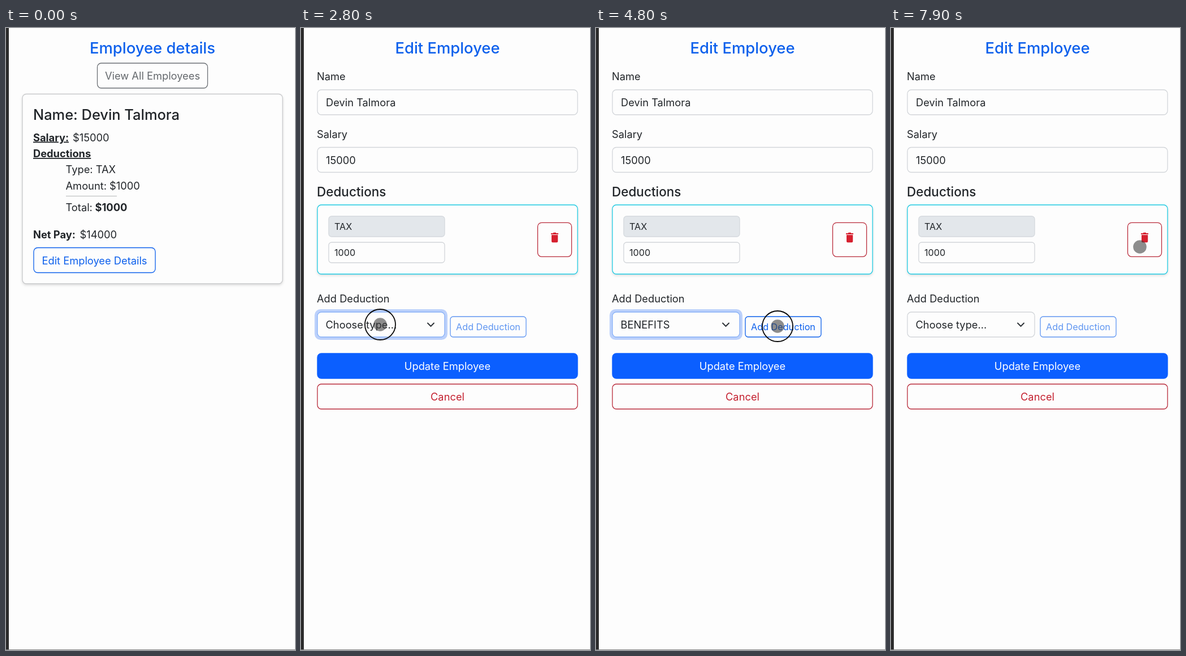
An HTML page for the animation above (8000 ms loop, 511 px wide and 1097 px high).

```html
<!DOCTYPE html>
<html lang="en">
<head>
<meta charset="utf-8">
<title>Employee payroll</title>
<style>
html, body { margin: 0; width: 100%; height: 100%; overflow: hidden; background: #fdfdfd; }
svg { display: block; }
text { font: 18.3px Inter, "Noto Sans", sans-serif; font-optical-sizing: none; fill: #212529; white-space: pre; }
.title { font-size: 27.4px; font-weight: 500; fill: #0d60ec; }
.name { font-size: 25.4px; font-weight: 500; }
.sub { font-size: 22.5px; font-weight: 500; }
.small { font-size: 16.2px; }
.item { font-size: 12.8px; fill: #f4f4f4; }
.bold { font-weight: 700; }
.line { text-decoration: underline; }
.mid { text-anchor: middle; }
.blue { fill: #0d60ec; }
.red { fill: #c4202f; }
.grey { fill: #65696d; }
.white { fill: #fff; }
.card { filter: drop-shadow(0 2px 2px rgba(0, 0, 0, .13)); }
.menu { filter: drop-shadow(0 3px 5px rgba(0, 0, 0, .35)); }
</style>
</head>
<body>
<svg id="stage" width="511" height="1097" viewBox="0 0 511 1097"></svg>
<script>
const BLUE = '#0d60ec', RED = '#b92b3b', CYAN = '#1fcbe3', LINE = '#d3d6da';
const PERSON = 'Devin Talmora', CARD_STEP = 141.6;
const $ = id => document.getElementById(id);

const box = (x, y, w, h, stroke, fill = '#fdfdfd', r = 7, extra = '') =>
  `<rect x="${x}" y="${y}" width="${w}" height="${h}" rx="${r}" fill="${fill}" stroke="${stroke}" stroke-width="1.3" ${extra}/>`;
const text = (x, y, str, cls = '', id = '') =>
  `<text x="${x}" y="${y}" class="${cls}" id="${id}">${str}</text>`;
const field = (y, label, value) =>
  text(28, y - 17, label) + box(29, y, 460, 44, LINE) + text(44, y + 29.3, value);

const deduction = (type, amount) =>
  box(29, 312, 460, 122, CYAN, '#fdfdfd', 7, 'class="card"') +
  box(49, 332, 205, 36, '#d5d9de', '#e3e7eb', 5) + text(59, 356.2, type, 'small') +
  box(49, 378, 205, 36, LINE, '#fdfdfd', 5) + text(59, 402.2, amount, 'small') +
  box(418.5, 343.3, 60, 60, RED) +
  '<path d="M442 362h3.5l1-1.2h4l1 1.2h3.5v2h-13zM443 365h11.2v11.2q0 2-2 2h-7.200q-2 0-2-2z" fill="#d6202f"/>';

const details =
  text(259, 45, 'Employee details', 'title mid') +
  box(161.5, 62, 195, 44, '#6c7075') + text(259, 90.6, 'View All Employees', 'mid grey') +
  box(29, 116.500, 460, 334.5, '#c9cacc', '#fdfdfd', 7, 'class="card"') +
  text(48, 162, 'Name: ' + PERSON, 'name') +
  text(48, 199.500, 'Salary:', 'bold line') + text(118, 199.5, '$15000') +
  text(48, 228, 'Deductions', 'bold line') +
  text(105.5, 256.3, 'Type: TAX') + text(105.5, 284.7, 'Amount: $1000') +
  '<path d="M106 296.500h90" stroke="#c8c9ca" stroke-width="1.3"/>' +
  text(105.5, 323, 'Total:') + text(157.5, 323, '$1000', 'bold') +
  text(48, 370.5, 'Net Pay:', 'bold') + text(130.5, 370.5, '$14000') +
  box(49, 387.5, 215, 44, BLUE) + text(156.5, 417, 'Edit Employee Details', 'mid blue');

const actions =
  text(28, 484, 'Add Deduction') +
  box(26.5, 498.5, 230, 49, '#bcd1fb', 'none', 8, 'id="focus" style="stroke-width:5"') +
  box(29, 501, 225, 44, LINE, '#fdfdfd', 7, 'id="select"') +
  text(43.5, 529.8, '', '', 'choice') +
  '<path d="M224 520.500l5.500 5.500 5.500-5.500" fill="none" stroke="#2b3035" stroke-width="1.9" stroke-linecap="round" stroke-linejoin="round"/>' +
  `<g id="add">${box(264, 509, 134, 36, BLUE, '#fdfdfd', 5)}${text(331, 533, 'Add Deduction', 'small mid blue')}</g>` +
  box(29, 574, 460, 44, '#0b5fff', '#0b5fff') + text(259, 603.3, 'Update Employee', 'mid white') +
  box(29, 628, 460, 44, RED) + text(259, 657.3, 'Cancel', 'mid red');

const edit =
  text(259, 45, 'Edit Employee', 'title mid') +
  field(109, 'Name', PERSON) + field(210.5, 'Salary', '15000') +
  text(28, 297, 'Deductions', 'sub') +
  deduction('TAX', '1000') +
  `<g id="extra" transform="translate(0 ${CARD_STEP})">${deduction('BENEFITS', '0')}</g>` +
  `<g id="actions">${actions}</g>`;

const menu =
  box(10, 331, 159, 121, '#787678', '#575557', 7, 'class="menu"') +
  box(16, 0, 147, 27, 'none', '#4d8de6', 4, 'id="hover"') +
  '<path d="M22.500 351.500l3.500 4.500 6.500-10.500" fill="none" stroke="#f4f4f4" stroke-width="1.8" stroke-linecap="round"/>' +
  ['Choose type...', 'BENEFITS', 'UNION', 'OTHER']
    .map((s, i) => text(38.5, 353.3 + 27.3 * i, s, 'item')).join('');

$('stage').innerHTML =
  '<path d="M0 0h511v1097H0z" fill="#fdfdfd"/>' +
  `<g id="details">${details}</g><g id="edit">${edit}</g><g id="menu">${menu}</g>` +
  '<path d="M0 0h5v1097H0z" fill="#2b2b2b"/><path d="M0 1096.500h511" stroke="#858585"/>' +
  '<g id="pointer">' +
    '<circle id="dot" r="11.800" fill="#3c3c3c" fill-opacity=".58"/>' +
    '<circle id="ring" r="27" fill="none" stroke="#0a0a0a" stroke-width="1.8"/>' +
    '<path id="arrow" d="M0 0v18.500l4.300-3.900 3 7.100 3.300-1.400-3-6.900h5.800z" fill="#0a0a0a" stroke="#fff" stroke-width="1.3"/>' +
  '</g>';

// Pointer stops: time, x, y
const stops = [
  [300, 474, 740], [600, 459, 725], [700, 459, 725], [1600, 212, 410], [1800, 212, 410],
  [2000, 212, 402], [2600, 140, 523], [2900, 140, 523], [3300, 100, 415], [3500, 95, 389],
  [3800, 85, 374], [4100, 85, 374], [4600, 321, 526], [5400, 321, 526], [5800, 368, 574],
  [6200, 465, 526], [6700, 465, 526], [7900, 440, 386]
];
const clicks = [[1600, 1800], [2700, 2900], [4700, 4900], [6300, 6500]];

function pointerAt(t) {
  const next = stops.findIndex(s => s[0] > t);
  if (next < 1) return stops[next ? stops.length - 1 : 0].slice(1);
  const [t0, x0, y0] = stops[next - 1], [t1, x1, y1] = stops[next];
  const p = (t - t0) / (t1 - t0), e = p * p * (3 - 2 * p);
  return [x0 + (x1 - x0) * e, y0 + (y1 - y0) * e];
}

const show = (id, on) => $(id).setAttribute('display', on ? 'inline' : 'none');
const set = (id, attr, value) => $(id).setAttribute(attr, value);

function draw(t) {
  const within = (a, b) => t >= a && t < b;
  const editing = t >= 1800, open = within(2900, 4100), chosen = within(4100, 4900);
  const focused = within(2800, 4900), added = within(4900, 6500);

  show('details', !editing);
  show('edit', editing);
  show('extra', added);
  set('actions', 'transform', `translate(0 ${added ? CARD_STEP : 0})`);
  show('focus', focused);
  set('select', 'stroke', focused ? '#86b0f8' : LINE);
  $('choice').textContent = chosen ? 'BENEFITS' : 'Choose type...';
  set('add', 'opacity', chosen ? 1 : .65);

  show('menu', open);
  const row = Math.round((pointerAt(t - 100)[1] - 349) / 27.3);
  set('hover', 'y', 336.9 + 27.3 * (row > 3 ? 0 : row));

  const [x, y] = pointerAt(t);
  show('pointer', t >= 300);
  set('pointer', 'transform', `translate(${x} ${y})`);
  show('dot', !open);
  show('arrow', open);
  show('ring', clicks.some(([a, b]) => within(a, b)));
}

function frame() {
  draw(Math.floor(performance.now() % 8000 / 100) * 100);
  requestAnimationFrame(frame);
}
frame();
</script>
</body>
</html>
```
